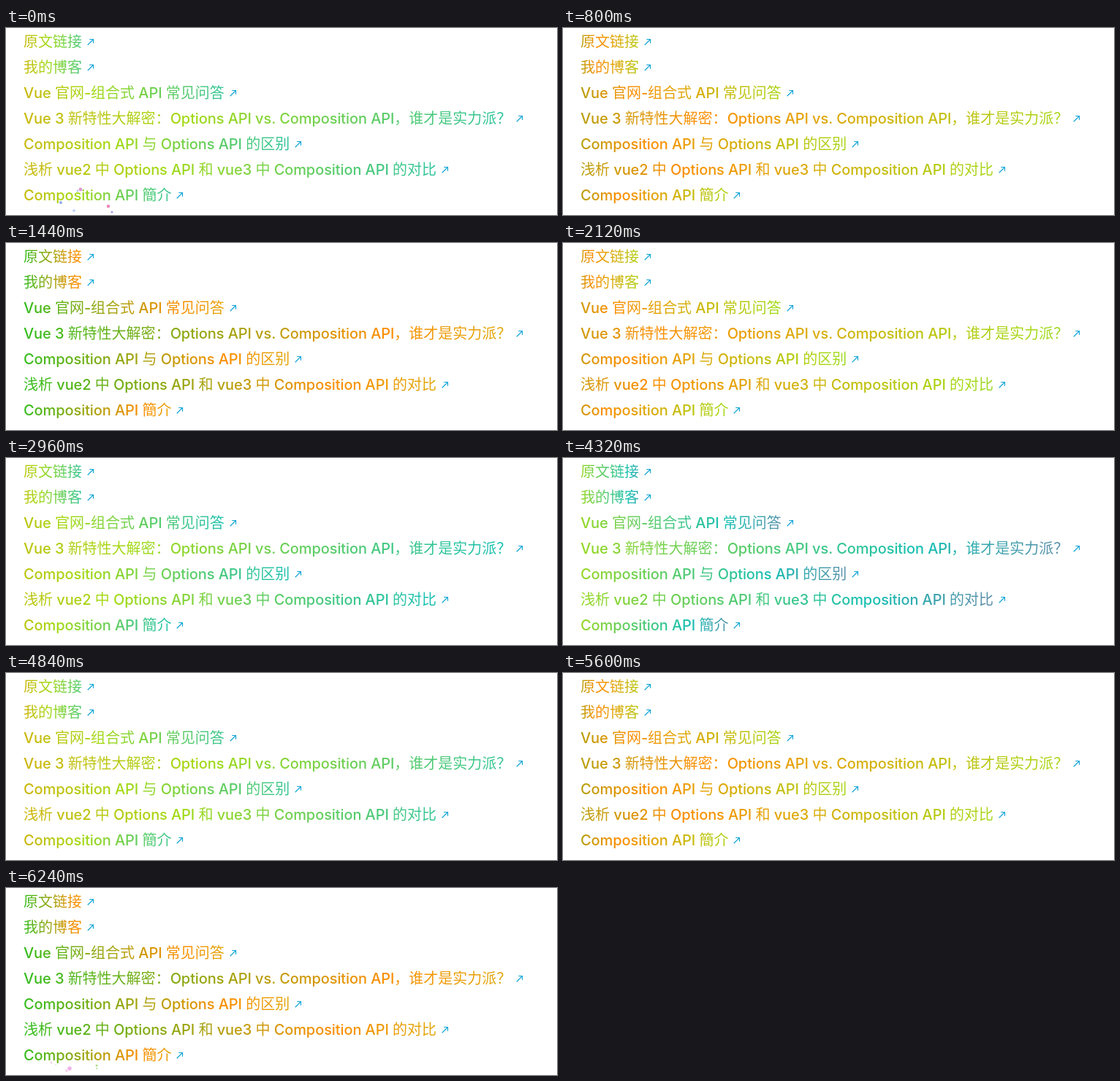
Animation of 754x256 px, one loop 6280 ms. Source, as an HTML page with a canvas:

```html
<!DOCTYPE html>
<html lang="zh-CN">
<head>
<meta charset="utf-8">
<title>Links</title>
<style>
html, body { margin: 0; width: 754px; height: 256px; overflow: hidden; background: #fff; }
body { position: relative; font: 500 20px/35px Inter, "Noto Sans CJK SC", "Noto Sans CJK", sans-serif; }
.row {
  position: absolute; left: 24px; height: 35px; padding-right: 19px; white-space: pre;
  letter-spacing: -0.09px;
  color: transparent;
  background: linear-gradient(90deg, #2cbf1e, #fc8f04, #a4da16, #18c0b4, #c43a98) var(--x, 0) 0 / 300% 100%;
  -webkit-background-clip: text; background-clip: text;
}
.row i { font-style: normal; font-weight: 350; letter-spacing: 0; }
.row svg { position: absolute; right: 0; top: 9.4px; width: 14px; height: 14px; fill: #10a4d8; }
canvas { position: absolute; left: 0; top: 0; }
</style>
</head>
<body>
<script>
const LOOP = 6280, FRAME = 40;
const SWEEP = 2400, TURN = 1410; // one-way travel and first turning point, ms

const lines = [
  "原文链接",
  "我的博客",
  "Vue 官网-组合式 API 常见问答",
  "Vue 3 新特性大解密：Options API vs. Composition API，谁才是实力派？",
  "Composition API 与 Options API 的区别",
  "浅析 vue2 中 Options API 和 vue3 中 Composition API 的对比",
  "Composition API 簡介"
];
const arrow = '<svg viewBox="0 0 24 24"><path d="M9 5v2h6.59L4 18.59 5.41 20 17 8.41V15h2V5z"/></svg>';

lines.forEach((text, i) => {
  const row = document.createElement("div");
  row.className = "row";
  row.style.top = 2.3 + 35 * i + "px";
  row.innerHTML = text.replace(/[\u3000-\u9fff\uff00-\uffef]+/g, "<i>$&</i>") + arrow;
  document.body.append(row);
});

const canvas = document.createElement("canvas");
canvas.width = 754;
canvas.height = 256;
document.body.append(canvas);
const ctx = canvas.getContext("2d");

// Cursor dust: x, y, radius, colour, reference time, birth, death
const dust = [
  [75, 239, 2, "#7f9df0", 0, 0, 360],
  [102, 221, 2.4, "#d58ad0", 0, 0, 480],
  [98, 223, 1.4, "#a9b4f2", 0, 0, 320],
  [93, 250, 1.7, "#a8bdf5", 0, 0, 240],
  [140, 244, 2.3, "#e477ae", 0, 0, 520],
  [145, 252, 1.6, "#8d8fe6", 0, 0, 400],
  [62, 239, 1.5, "#f3cbe4", 6240, 5960, 6500],
  [68, 242, 1, "#f3d6e8", 6240, 6000, 6500],
  [87, 247, 2.8, "#eda6e4", 6240, 6040, 6700],
  [83, 250, 1.7, "#f2c0ea", 6240, 6040, 6600],
  [124, 243, 1.5, "#9bd873", 6240, 6120, 6700],
  [124.5, 247, 1.2, "#b4dd95", 6240, 6120, 6700]
];

function drawDust(t) {
  ctx.clearRect(0, 0, 754, 256);
  for (const [x, y, r, color, ref, birth, death] of dust) {
    if (t < birth || t >= death) continue;
    const fade = Math.min(1, (death - t) / (death - ref));
    ctx.globalAlpha = 0.85 * fade;
    ctx.fillStyle = color;
    ctx.beginPath();
    ctx.arc(x, y + (t - ref) * 0.03, r * (0.4 + 0.6 * fade), 0, 7);
    ctx.fill();
  }
}

function render(now) {
  const t = Math.floor(now % LOOP / FRAME) * FRAME;
  const phase = Math.abs(t - TURN) % (2 * SWEEP);
  const pos = (SWEEP - Math.abs(phase - SWEEP)) / SWEEP;
  document.body.style.setProperty("--x", pos * 100 + "%");
  drawDust(t);
}

const start = performance.now();
function tick() {
  render(performance.now() - start);
  requestAnimationFrame(tick);
}
tick();
</script>
</body>
</html>
```
